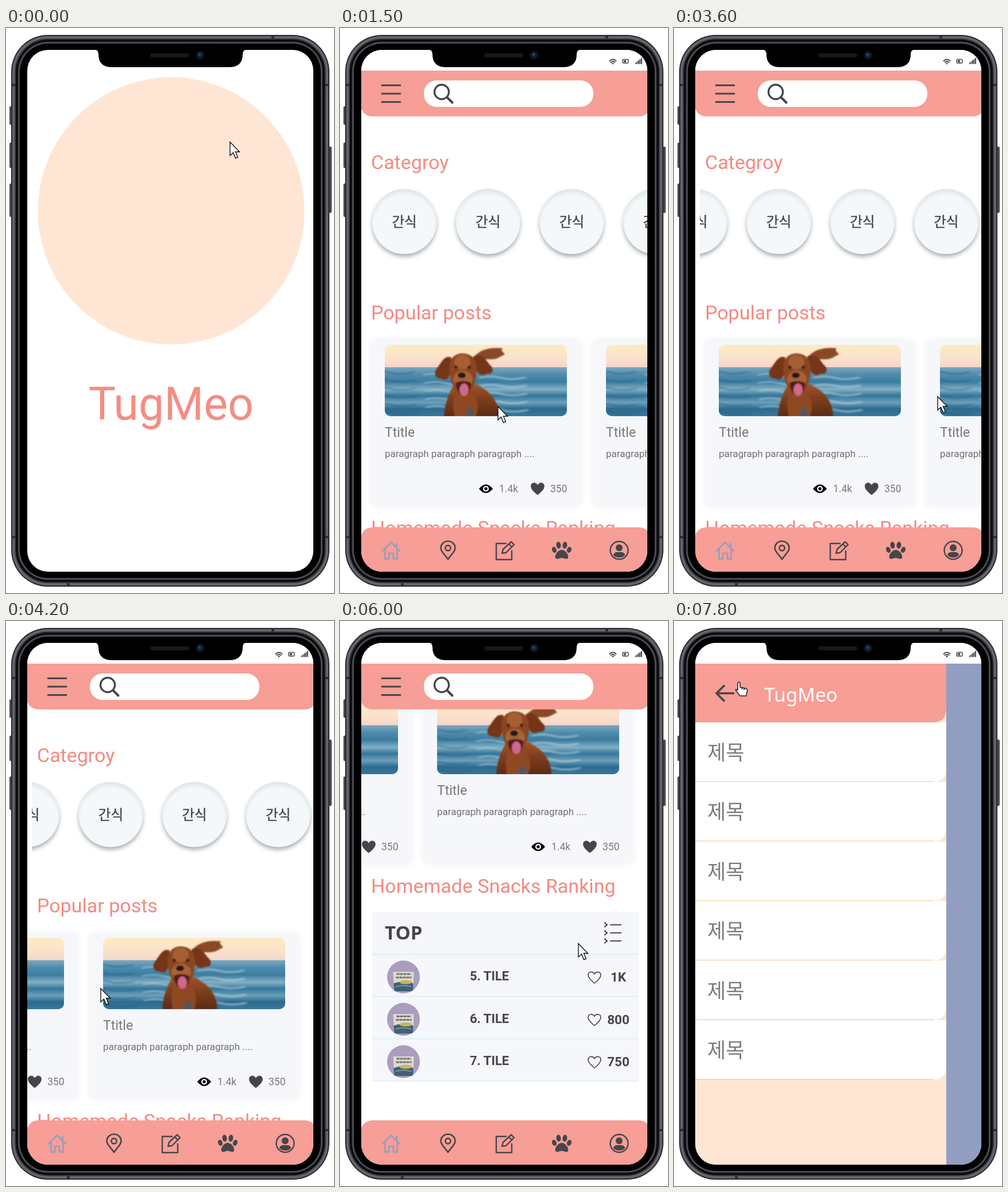
Write an HTML page that moves like this. It is 571x981 px and loops after 8 s.

```html
<!DOCTYPE html>
<html lang="ko">
<head>
<meta charset="utf-8">
<title>Pet snack app</title>
<style>
  html, body { margin: 0; width: 100%; height: 100%; overflow: hidden; background: #fff; }
  svg { display: block; width: 100%; height: 100%; }
  text { font-family: Roboto, sans-serif; }
  .ko { font-family: "Noto Sans CJK KR", "Noto Sans CJK", sans-serif; }
  .noto { font-family: "Noto Sans", "Open Sans", sans-serif; }
  .mid { text-anchor: middle; }
  .bold { font-weight: 700; }
  .head { fill: #f48a81; }
  .icon { fill: none; stroke: #46464a; stroke-width: 2.6; stroke-linecap: round; stroke-linejoin: round; }
</style>
</head>
<body>
<svg id="stage" viewBox="0 0 571 981" preserveAspectRatio="none"></svg>
<script>
const CORAL = '#f79e96', PANEL = '#f5f7fb', PEACH = '#ffe6d4', INK = '#46464a';
const STEP = 300, LOOP = 8000;
const CAT_GAP = 145.7, CARD_GAP = 385, ROW = 73.5;

const rect = (x, y, w, h, r, fill, more = '') =>
  `<rect x="${x}" y="${y}" width="${w}" height="${h}" rx="${r}" fill="${fill}" ${more}/>`;
const circle = (x, y, r, fill, more = '') => `<circle cx="${x}" cy="${y}" r="${r}" fill="${fill}" ${more}/>`;
const ellipse = (x, y, rx, ry, fill, turn = 0) =>
  `<ellipse rx="${rx}" ry="${ry}" fill="${fill}" transform="translate(${x} ${y}) rotate(${turn})"/>`;
const path = (d, more = '') => `<path d="${d}" ${more}/>`;
const text = (x, y, str, size, fill, cls = '') =>
  `<text x="${x}" y="${y}" font-size="${size}" fill="${fill}" class="${cls}">${str}</text>`;
const group = (body, more = '') => `<g ${more}>${body}</g>`;
const at = (x, y, body) => group(body, `transform="translate(${x} ${y})"`);
const repeat = (n, fn) => Array.from({ length: n }, (_, i) => fn(i)).join('');
const fade = (id, stops, dir = 'x2="0" y2="1"') => `<linearGradient id="${id}" ${dir}>` +
  stops.map(([o, c]) => `<stop offset="${o}" stop-color="${c}"/>`).join('') + '</linearGradient>';

const HEART = 'M0 10C-5 6-11 1-11-4.2C-11-10-3.4-12 0-6C3.4-12 11-10 11-4.2C11 1 5 6 0 10Z';

const defs = `<defs>
  <clipPath id="screen">${rect(37, 38, 498, 906, 36)}</clipPath>
  <clipPath id="cats">${rect(45, 260, 490, 150, 0)}</clipPath>
  <clipPath id="photo">${rect(0, 0, 317, 124, 10)}</clipPath>
  <clipPath id="thumb">${circle(0, 0, 28.5)}</clipPath>
  <clipPath id="rows">${rect(56, 987, 464, 220.5, 0)}</clipPath>
  <filter id="soft" x="-20%" y="-20%" width="140%" height="140%"><feGaussianBlur stdDeviation="3.5"/></filter>
  <filter id="haze" x="-20%" y="-20%" width="140%" height="140%"><feGaussianBlur stdDeviation="2.5 1.3"/></filter>
  <filter id="fur" x="-20%" y="-20%" width="140%" height="140%"><feGaussianBlur stdDeviation=".8"/></filter>
  <radialGradient id="disc" cx=".5" cy=".56" r=".56">
    <stop offset=".82" stop-color="#f4f8fb"/><stop offset="1" stop-color="#dce5e5"/></radialGradient>
  ${fade('sky', [[0, '#fdebc3'], [0.5, '#fbe2cb'], [1, '#f0cfcb']])}
  ${fade('sea', [[0, '#7fa6bc'], [0.15, '#4f8cad'], [0.3, '#3b7c9f'], [0.45, '#83afc3'], [0.58, '#34769b'],
    [0.72, '#6c9fb8'], [0.85, '#2c6a90'], [1, '#3a7799']])}
  ${fade('coat', [[0, '#a2552a'], [0.45, '#7e3e1d'], [1, '#5d2a13']])}
</defs>`;

function photo() {
  const waves = repeat(16, i => {
    const x = (i * 97) % 290 - 30, y = 48 + i * 4.7;
    return path(`M${x} ${y}q20 -5 38 0t44 -1`, `stroke="${i % 3 ? '#b9d2dc' : '#22587c'}" stroke-width="${2 + i % 3}"`);
  });
  const dog =
    path('M152 26C160 12 176 3 206 6C200 9 206 12 209 17C200 20 196 27 178 25C170 25 166 30 160 34Z', 'fill="#8a4a25"') +
    path('M103 124C105 98 112 84 120 70L158 68C182 80 198 96 199 124Z', 'fill="url(#coat)"') +
    path('M124 82L152 84C164 96 164 112 158 124H122C118 108 118 94 124 82Z', 'fill="#8f4a22"') +
    path('M116 22C104 17 99 30 90 42C84 52 90 60 98 58C108 66 115 54 114 42Z', 'fill="#743517"') +
    path('M154 20C166 14 174 22 182 34C192 42 188 52 178 50C168 56 160 50 158 40Z', 'fill="#743517"') +
    path('M112 44C111 24 122 15 135 15C150 15 160 24 160 42C160 62 152 84 137 88C122 84 113 62 112 44Z', 'fill="#8a4520"') +
    ellipse(135, 30, 14, 13, '#a65e30') + ellipse(136, 60, 17, 15, '#a86237') +
    path('M123 66Q136 60 150 66Q149 86 138 89Q126 86 123 66Z', 'fill="#4f1a1a"') +
    ellipse(138, 78, 8, 11, '#d0688a') +
    ellipse(134, 53, 7, 5, '#2b1512') + circle(124, 39, 2.6, '#2a120c') + circle(147, 39, 2.6, '#2a120c') +
    circle(148, 117, 7.5, '#56555a');
  return group(
    rect(0, 0, 317, 46, 0, 'url(#sky)') + rect(0, 39, 317, 85, 0, 'url(#sea)') +
    group(waves, 'fill="none" opacity=".5" filter="url(#haze)"') + group(dog, 'filter="url(#fur)"'),
    'clip-path="url(#photo)"');
}

const eye = path('M-12 0Q0-15 12 0Q0 15-12 0Z') + circle(0, 0, 5, '#fff') + circle(0, 0, 2.7, '#000');

const card = x => at(x, 0,
  rect(-6, 538, 373, 296, 16, '#f7f7f9', 'filter="url(#soft)"') +
  rect(0, 540, 361, 283, 14, PANEL) +
  at(22, 550, photo()) +
  text(22, 710, 'Ttitle', 23, '#79797c') +
  text(22, 745, 'paragraph paragraph paragraph ....', 17, '#707074') +
  at(198, 800, eye) + text(221, 806, '1.4k', 17.5, '#79797c') +
  at(288, 800, path(HEART, `fill="${INK}" transform="scale(1.08)"`)) +
  text(310, 806, '350', 17.5, '#79797c'));

const category = i => at(112 + i * CAT_GAP, 336,
  circle(0, 5, 56, '#9aa0a3', 'filter="url(#soft)" opacity=".85"') +
  circle(0, 0, 56.5, 'url(#disc)') +
  `<text y="9" font-size="23.5" fill="${INK}" class="ko mid" font-weight="500" stroke="${INK}" stroke-width=".4">간식</text>`);

const thumb = group(
  rect(-29, -29, 58, 58, 0, '#aa9dbe') +
  path('M-18 -9L18 -9L17 25L-16 25Z', 'fill="#dedbcf"') +
  path('M-17 11Q0 5 17 11L17 25L-16 25Z', 'fill="#3f6174"') +
  ellipse(4, 9, 11, 3.5, '#cbb45f') +
  path('M-12 -5H13M-13 1H14', 'stroke="#6d7172" stroke-width="3" stroke-dasharray="5 1"') +
  path('M-14 17Q0 13 14 17', 'fill="none" stroke="#8ba3ad" stroke-width="1.5"'), 'clip-path="url(#thumb)"');

const row = (likes, i) => at(0, 987 + i * ROW,
  at(110.5, 39, thumb) +
  text(226, 45, `${i + 1}. TILE`, 22, INK, 'bold') +
  at(443, 40, path(HEART, 'class="icon" style="stroke-width:1.6"')) +
  text(484.5, 47, likes, 22.5, INK, 'bold mid') +
  rect(56, ROW - 1.2, 464, 1.4, 0, '#d9ebf3'));

const ranking =
  text(54, 880, 'Homemade Snacks Ranking', 34, '', 'head') +
  rect(56, 913, 464, 294, 0, PANEL) +
  text(78, 961, 'TOP', 33, INK, 'noto bold') +
  at(460, 949, repeat(3, i =>
    path(`M1 ${i * 14 - 17}l4 3.5l-4 3.5M11 ${i * 14 - 13.5}H29`, 'class="icon" style="stroke-width:2.2"'))) +
  rect(56, 986.2, 464, 1.4, 0, '#d9ebf3') +
  group(group(['18K', '15K', '5K', '3K', '1K', '800', '750'].map(row).join(''), 'id="list"'), 'clip-path="url(#rows)"');

const status =
  rect(37, 38, 498, 36, 0, '#fff') +
  at(475, 61, path('M-5.5 -4Q0 -9 5.5 -4M-3.5 -1.5Q0 -4.5 3.5 -1.5', 'class="icon" style="stroke-width:2"') + circle(0, 0.5, 1.5, INK)) +
  rect(492, 54.5, 10, 6.5, 2, 'none', `stroke="${INK}" stroke-width="1.5"`) + rect(494, 56, 4, 3.5, 0, INK) +
  repeat(5, i => rect(514 + i * 2.5, 60 - i * 2, 1.9, 2.5 + i * 2, 0, INK));

const header =
  rect(36, 74, 505, 79.5, 20, CORAL) + rect(36, 74, 505, 30, 0, CORAL) +
  path('M72 99.5H106M72 114H106M72 128.5H106', 'class="icon" style="stroke-width:3;stroke-linecap:butt"') +
  rect(146, 91, 295, 46, 22, '#fff') +
  path('M186.5 120.5L195.5 129.5', 'class="icon" style="stroke-width:4"') +
  circle(177, 111, 12.5, 'none', 'class="icon" style="stroke-width:3.4"');

const paw = group(
  path('M0 -1C6 -1 13 8 11 13C9 17 4 13 0 13C-4 13-9 17-11 13C-13 8-6-1 0-1Z') +
  ellipse(-5.5, -9, 4, 6, INK, -8) + ellipse(5.5, -9, 4, 6, INK, 8) +
  ellipse(-13, -1, 3.8, 5.4, INK, -22) + ellipse(13, -1, 3.8, 5.4, INK, 22), `fill="${INK}"`);

const nav =
  rect(36, 867, 505, 90, 20, CORAL) +
  at(89, 907, path('M-15 1L0 -14L15 1M-10.5 -2V15H-4V5H4V15H10.5V-2M9.5 -5V-12', 'class="icon" style="stroke:#929dbd"')) +
  at(188, 907, path('M0 15.5C-5 8-12.5 2-12.5 -4A12.5 12 0 0 1 12.5 -4C12.5 2 5 8 0 15.5Z', 'class="icon"') +
    circle(0, -4, 4.6, 'none', 'class="icon"')) +
  at(287, 907, path('M2 -12H-15V16H12V1M-5 5L-3 -2L11 -15L16 -10L2 4ZM7 -11L12 -6', 'class="icon" style="stroke-width:2.4"')) +
  at(386, 907, paw) +
  at(486, 907, circle(0, 0, 15.5, 'none', 'class="icon" style="stroke-width:2.4"') + circle(0, -4.5, 6, INK) +
    path('M-10.5 8Q-8 3-4 3H4Q8 3 10.5 8Q6 12.5 0 12.5T-10.5 8Z', `fill="${INK}"`));

const home = group(
  group(
    text(54, 245, 'Categroy', 34, '', 'head') +
    group(group(repeat(5, category), 'id="strip"'), 'clip-path="url(#cats)"') +
    text(54, 506, 'Popular posts', 34, '', 'head') +
    group(repeat(2, i => card(56 + i * CARD_GAP)), 'id="cards"') + ranking, 'id="page"') +
  status + header + nav, 'id="home"');

const splash = group(
  circle(287.5, 317.5, 232, PEACH) + text(287.5, 680, 'TugMeo', 79, '#f58d83', 'mid'), 'id="splash"');

// Panel with only its lower right corner rounded
const tab = (y, h, fill) => path(`M37 ${y}H474V${y + h - 24}Q474 ${y + h} 450 ${y + h}H37Z`, `fill="${fill}"`);

const menu = group(
  rect(37, 74, 437, 870, 0, PEACH) + rect(474, 74, 62, 870, 0, '#919ec1') +
  tab(74, 102, CORAL) +
  path('M105 125.5H74M88 111.5L74 125.5L88 139.5', 'class="icon" style="stroke-width:3.6;stroke-linecap:butt;stroke-linejoin:miter"') +
  text(157, 140, 'TugMeo', 33.5, '#fff', 'noto') +
  repeat(6, i => {
    const y = 176 + i * 103.4;
    return tab(y, 103.2, '#fff') + rect(37, y + 102, 415, 1.5, 0, '#f8d0a6') +
      text(58, y + 65, '제목', 35, '#7b7b7d', 'ko');
  }) + status, 'id="menu"');

// Nested rings of the case: [inset, colour]
const shell = [[0, '#1d1e21'], [1.5, '#55575d'], [3, '#65676e'], [6, '#3c3d42'], [8, '#0b0c0e'],
  [11.5, '#2b2c30'], [13, '#6b6d73'], [14.2, '#222326'], [15.5, '#000']];
const body =
  rect(6, 136, 6, 32, 2, '#4a4b50') + rect(6, 199, 6, 44, 2, '#4a4b50') + rect(6, 270, 6, 58, 2, '#4a4b50') +
  rect(561, 206, 6, 115, 2, '#4a4b50') +
  shell.map(([d, c]) => rect(9 + d, 12 + d, 554 - 2 * d, 958 - 2 * d, 64 - d, c)).join('') +
  [97, 882].map(y => rect(9, y, 8, 4, 0, '#2c2d31') + rect(555, y, 8, 4, 0, '#2c2d31')).join('') +
  rect(106, 964, 5, 6, 0, '#2c2d31') + rect(462, 12, 5, 6, 0, '#2c2d31');

const notch =
  path('M152 37Q161 37 161 46Q161 68 185 68H388Q412 68 412 46Q412 37 421 37Z') +
  rect(251, 44, 68, 7, 3.5, '#17181a') +
  circle(338, 47, 7.5, '#10131a') + circle(338, 47, 4.5, '#132444') + circle(337, 46, 2, '#2a4a86');

const arrow = path('M0 0V23.5L5.5 18.5L9.5 28L13.5 26.3L9.5 17H16.5Z',
  'id="arrow" fill="#fff" stroke="#111" stroke-width="1.4"');
const hand = path('M6 15V3Q8 -1 10 3V10L20 12Q23 13 22.5 17L20.5 25H10L3 16Q1 12 6 15ZM13.5 10.5V14M17 11V15',
  'id="hand" fill="#fff" stroke="#222" stroke-width="1.5" stroke-linejoin="round"');

document.getElementById('stage').innerHTML = defs + body +
  group(rect(37, 38, 498, 906, 0, '#fff') + splash + home + menu, 'clip-path="url(#screen)"') +
  notch + group(arrow + hand, 'id="cursor"');
for (const head of document.querySelectorAll('.head')) head.setAttribute('fill', '#f48a81');

const el = id => document.getElementById(id);
const show = (id, on) => el(id).setAttribute('display', on ? 'inline' : 'none');
const move = (id, x, y) => el(id).setAttribute('transform', `translate(${x} ${y})`);

// Linear value between [time, value] keys
function track(keys, t) {
  const i = keys.findIndex(k => k[0] > t);
  if (i === 0) return keys[0][1];
  if (i < 0) return keys[keys.length - 1][1];
  const [t0, a] = keys[i - 1], [t1, b] = keys[i];
  return a + (b - a) * (t - t0) / (t1 - t0);
}

const strip = [[2400, 0], [2700, -116], [3000, -221]];
const cards = [[3600, 0], [4200, -294]];
const page = [[4200, 0], [4800, -408]];
const list = [[4800, 0], [5100, -22], [6000, -294]];
const cursorX = [[0, 390], [600, 385], [1500, 275], [2400, 434], [2700, 318], [3000, 213], [3600, 459],
  [4200, 165], [4500, 400], [5100, 419], [6000, 415], [7200, 112], [7500, 111], [7800, 105]];
const cursorY = [[0, 198], [600, 230], [1500, 657], [2400, 340], [2700, 338], [3000, 340], [3600, 640],
  [4200, 638], [4500, 720], [4800, 643], [5100, 621], [6000, 560], [7200, 81], [7800, 105]];

function draw(now) {
  const t = Math.floor(now % LOOP / STEP) * STEP;
  const menuOpen = t >= 7800;
  show('splash', t < 900);
  show('home', t >= 900 && !menuOpen);
  show('menu', menuOpen);
  show('arrow', !menuOpen);
  show('hand', menuOpen);
  move('strip', track(strip, t), 0);
  move('cards', track(cards, t), 0);
  move('page', 0, track(page, t));
  move('list', 0, track(list, t));
  move('cursor', track(cursorX, t), track(cursorY, t));
}

const start = performance.now();
function tick() {
  draw(performance.now() - start);
  requestAnimationFrame(tick);
}
tick();
</script>
</body>
</html>
```
